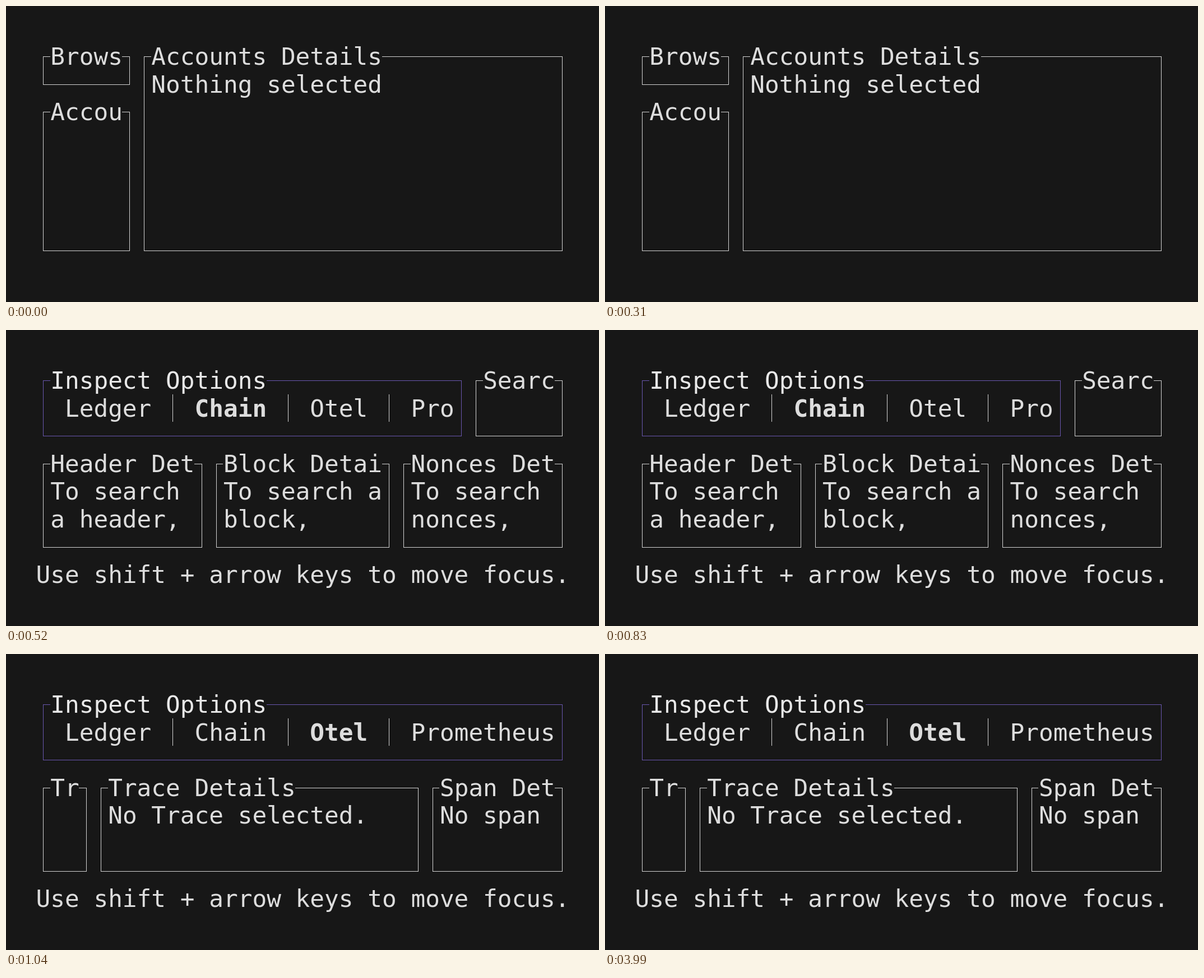
Recreate the animation shown at these times as an HTML page with a canvas. Size 1058 px wide and 529 px high, loop 5960 ms.

```html
<!DOCTYPE html>
<html lang="en">
<head>
<meta charset="utf-8">
<title>Terminal panels</title>
<style>
  html, body { margin: 0; height: 100%; overflow: hidden; background: #171717; }
  canvas { display: block; }
</style>
</head>
<body>
<canvas id="stage" width="1058" height="529"></canvas>
<script>
const ctx = document.getElementById('stage').getContext('2d');
const LEFT = 53.5, TOP = 65.8, CELL_W = 25.73, CELL_H = 49.57;
const FONT = '42.74px "DejaVu Sans Mono", monospace';
const TEXT = '#dddddd', BRIGHT = '#e8e8e8', LINE = '#d4d4d4', FOCUS = '#6a57b0';
const LOOP = 5960;

const cellX = col => LEFT + col * CELL_W;
const midX = col => Math.floor(cellX(col + 0.5));
const midY = row => Math.floor(TOP + (row + 0.5) * CELL_H);

function text(col, row, str, { bold = false, color = TEXT } = {}) {
  ctx.font = (bold ? 'bold ' : '') + FONT;
  ctx.fillStyle = color;
  ctx.fillText(str, cellX(col), TOP + (row + 0.5) * CELL_H + 14.6);
}

function rule(x1, y1, x2, y2, color = LINE) {
  ctx.fillStyle = color;
  ctx.fillRect(x1, y1, x2 - x1 + 1, y2 - y1 + 1);
}

// A bordered panel with its title set into the top edge, in cell coordinates.
function panel(c1, r1, c2, r2, title, lines = [], focused = false) {
  const x1 = midX(c1), x2 = midX(c2), y1 = midY(r1), y2 = midY(r2);
  const color = focused ? FOCUS : LINE;
  rule(x1, y1, x1, y2, color);
  rule(x2, y1, x2, y2, color);
  rule(x1, y2, x2, y2, color);
  rule(x1, y1, Math.floor(cellX(c1 + 1)) - 1, y1, color);
  rule(Math.floor(cellX(c1 + 1 + title.length)), y1, x2, y1, color);
  text(c1 + 1, r1, title, { color: focused ? BRIGHT : TEXT });
  lines.forEach((line, i) => text(c1 + 1, r1 + 1 + i, line));
}

function inspector(lastCol, active, lastTab) {
  panel(0, 0, lastCol, 2, 'Inspect Options', [], true);
  let col = 2;
  ['Ledger', 'Chain', 'Otel', lastTab].forEach((tab, i) => {
    if (i) rule(midX(col - 2), 115, midX(col - 2), 163);
    text(col, 1, tab, { bold: tab === active });
    col += tab.length + 3;
  });
  text(0, 7, 'Use shift + arrow keys to move focus.');
}

function accounts() {
  panel(0, 0, 6, 1, 'Brows');
  panel(0, 2, 6, 7, 'Accou');
  panel(7, 0, 36, 7, 'Accounts Details', ['Nothing selected']);
}

function chain() {
  inspector(29, 'Chain', 'Pro');
  panel(30, 0, 36, 2, 'Searc');
  panel(0, 3, 11, 6, 'Header Det', ['To search', 'a header,']);
  panel(12, 3, 24, 6, 'Block Detai', ['To search a', 'block,']);
  panel(25, 3, 36, 6, 'Nonces Det', ['To search', 'nonces,']);
}

function otel() {
  inspector(36, 'Otel', 'Prometheus');
  panel(0, 3, 3, 6, 'Tr');
  panel(4, 3, 26, 6, 'Trace Details', ['No Trace selected.']);
  panel(27, 3, 36, 6, 'Span Det', ['No span']);
}

const start = performance.now();

function draw() {
  const t = (performance.now() - start) % LOOP;
  ctx.fillStyle = '#171717';
  ctx.fillRect(0, 0, 1058, 529);
  (t < 520 ? accounts : t < 1040 ? chain : otel)();
  requestAnimationFrame(draw);
}
draw();
</script>
</body>
</html>
```
